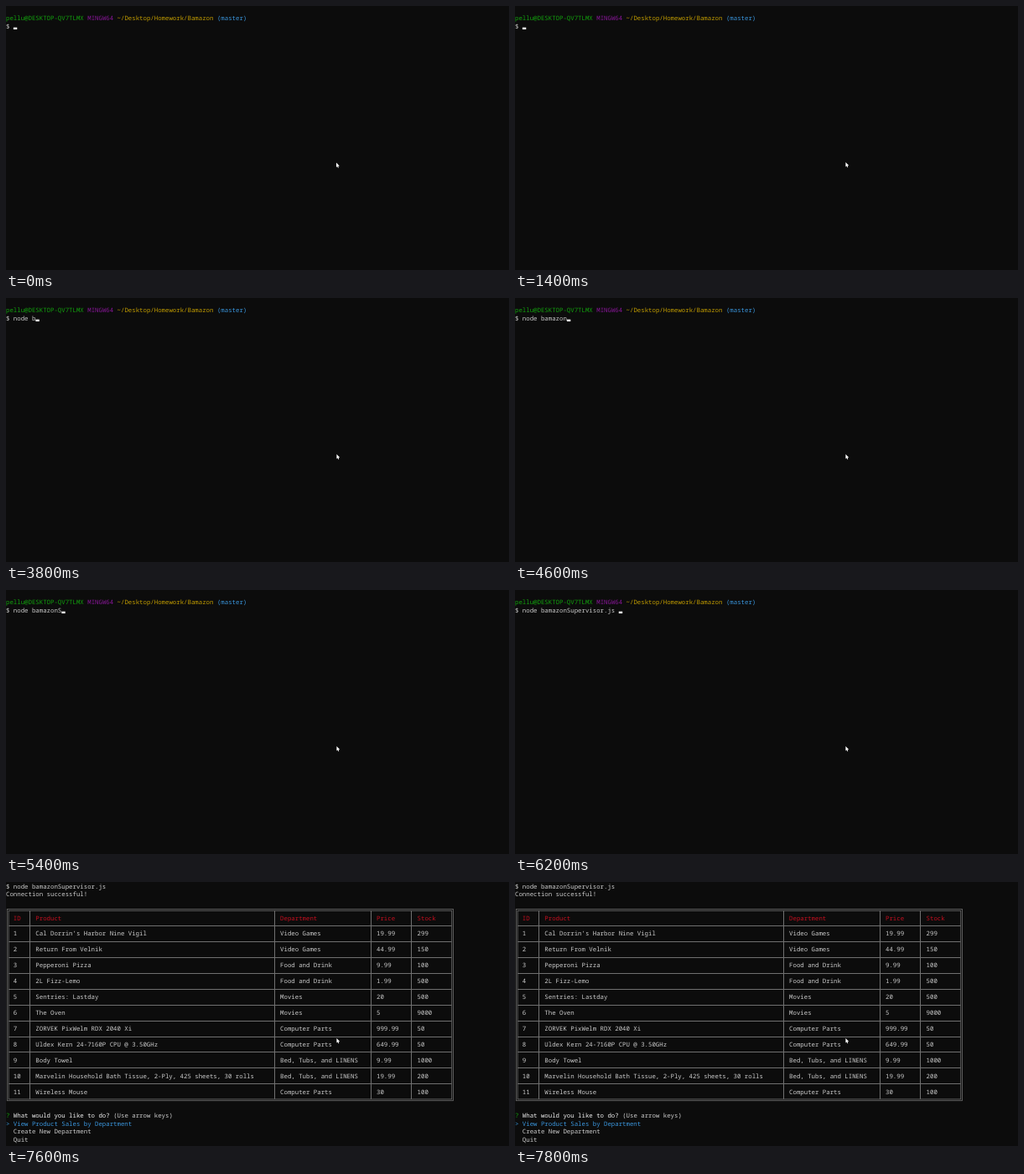
Animation, 600 px wide and 316 px high, one loop 8 s. Source, as an HTML page with a canvas:

```html
<!DOCTYPE html>
<html lang="en">
<head>
<meta charset="utf-8">
<title>Terminal session</title>
<style>
html, body { margin: 0; width: 100%; height: 100%; overflow: hidden; background: #0c0c0c; }
canvas { display: block; width: 600px; height: 316px; }
</style>
</head>
<body>
<canvas id="stage" width="600" height="316"></canvas>
<script>
const ctx = document.getElementById('stage').getContext('2d');
const LOOP = 8000, CELL = 4.42, LINE = 9.475, TOP = 5;
const C = {
  bg: '#0c0c0c', text: '#cccccc', bright: '#f2f2f2', green: '#13a10e', purple: '#881798',
  yellow: '#c19c00', cyan: '#3a96dd', red: '#c50f1f', rule: '#707070'
};

// What stands after the prompt, from each time on
const typed = [
  [0, ''], [3000, 'n'], [3200, 'node'], [3400, 'node '], [3800, 'node b'], [4000, 'node ba'],
  [4200, 'node bam'], [4600, 'node bamazon'], [5200, 'node bamazonS'],
  [6000, 'node bamazonSupervisor.js ']
];
const ENTER = 7200, CONNECTED = 7400, LISTED = 7600;

const columns = [2, 8, 74, 100, 111];
const dividers = [6, 72, 98, 109];
const LAST_COL = 120, TABLE_ROW = 3;
const table = [
  'ID|Product|Department|Price|Stock',
  '1|Cal Dorrin’s Harbor Nine Vigil|Video Games|19.99|299',
  '2|Return From Velnik|Video Games|44.99|150',
  '3|Pepperoni Pizza|Food and Drink|9.99|100',
  '4|2L Fizz-Lemo|Food and Drink|1.99|500',
  '5|Sentries: Lastday|Movies|20|500',
  '6|The Oven|Movies|5|9000',
  '7|ZORVEK PixWelm RDX 2040 Xi|Computer Parts|999.99|50',
  '8|Uldex Kern 24-7160P CPU @ 3.50GHz|Computer Parts|649.99|50',
  '9|Body Towel|Bed, Tubs, and LINENS|9.99|1000',
  '10|Marvelin Household Bath Tissue, 2-Ply, 425 sheets, 30 rolls|Bed, Tubs, and LINENS|19.99|200',
  '11|Wireless Mouse|Computer Parts|30|100'
].map(row => row.split('|'));

const midX = col => (col + 0.5) * CELL;
const midY = row => TOP + row * LINE;

function put(col, row, str, color = C.text) {
  ctx.fillStyle = color;
  ctx.fillText(str, col * CELL, midY(row) + 2.6);
}

function caret(col, row) {
  ctx.fillStyle = C.bright;
  ctx.fillRect(col * CELL, midY(row) + 1.7, CELL, 2.4);
}

function rule(x, y, w, h) {
  ctx.fillStyle = C.rule;
  ctx.fillRect(x, y, w, h);
}

function frame(x, y, w, h) {
  ctx.strokeStyle = C.rule;
  ctx.lineWidth = 0.8;
  ctx.strokeRect(x, y, w, h);
}

function drawTable() {
  const left = midX(0), right = midX(LAST_COL);
  const top = midY(TABLE_ROW), bottom = midY(TABLE_ROW + 2 * table.length);
  const w = right - left, h = bottom - top, gap = 0.9;
  frame(left - gap, top - gap, w + 2 * gap, h + 2 * gap);
  frame(left + gap, top + gap, w - 2 * gap, h - 2 * gap);
  for (const col of dividers) rule(Math.floor(midX(col)), top + gap, 1, h - 2 * gap);
  table.forEach((cells, i) => {
    const row = TABLE_ROW + 1 + 2 * i;
    if (i) rule(left + gap, Math.floor(midY(row - 1)), w - 2 * gap, 1);
    cells.forEach((cell, k) => put(columns[k], row, cell, i ? C.text : C.red));
  });
}

function drawMenu() {
  put(0, 29, '?', C.green);
  put(2, 29, 'What would you like to do?', C.bright);
  put(29, 29, '(Use arrow keys)');
  put(0, 30, '> View Product Sales by Department', C.cyan);
  put(2, 31, 'Create New Department');
  put(2, 32, 'Quit');
}

function drawPrompt() {
  put(0, 1, 'pellu@DESKTOP-QV7TLMX', C.green);
  put(22, 1, 'MINGW64', C.purple);
  put(30, 1, '~/Desktop/Homework/Bamazon', C.yellow);
  put(57, 1, '(master)', C.cyan);
}

function drawPointer(t) {
  const x = t < 200 ? 394 : 394.4, y = t < 200 ? 187.4 : 186.9;
  ctx.beginPath();
  [[0, 0], [0, 5.6], [1.2, 4.6], [2, 6.4], [2.9, 6], [2.2, 4.3], [3.8, 4.1]]
    .forEach(([dx, dy]) => ctx.lineTo(x + dx, y + dy));
  ctx.closePath();
  ctx.fillStyle = '#ffffff';
  ctx.fill();
}

function draw(t) {
  ctx.fillStyle = C.bg;
  ctx.fillRect(0, 0, 600, 316);
  ctx.font = '7.37px "Noto Sans Mono", "DejaVu Sans Mono", monospace';
  ctx.textRendering = 'geometricPrecision';

  const [since, input] = typed.filter(([at]) => at <= t).pop();
  const listed = t >= LISTED;
  const row = listed ? 0 : 2;
  if (!listed) drawPrompt();
  put(0, row, '$ ' + input);
  if (t >= CONNECTED) put(0, row + 1, 'Connection successful!');

  if (listed) {
    drawTable();
    drawMenu();
  } else if (t >= ENTER) {
    caret(0, t >= CONNECTED ? 4 : 3);
  } else {
    const blink = Math.floor((t + 600) / 400) % 2 === 1;
    const fresh = since > 0 && t - since < 400;
    if (blink || fresh) caret(2 + input.length, 2);
  }
  drawPointer(t);
}

const start = performance.now();
function tick() {
  draw((performance.now() - start) % LOOP);
  requestAnimationFrame(tick);
}
tick();
</script>
</body>
</html>
```
